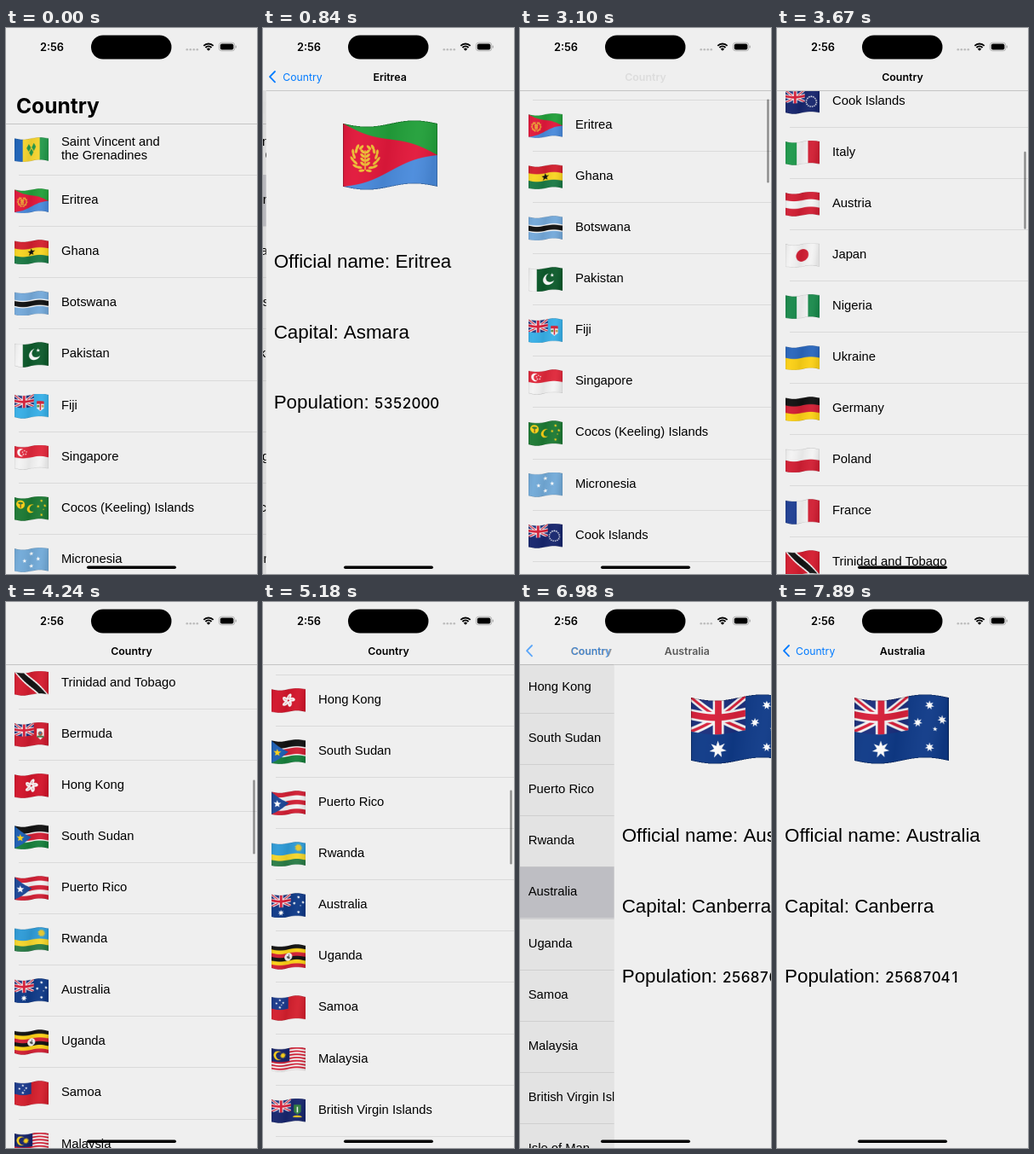
Write an HTML page with a canvas that moves like this. It is 295 px wide and 640 px high and loops after 8000 ms.

```html
<!DOCTYPE html>
<html lang="en">
<head>
<meta charset="utf-8">
<title>Country list</title>
<style>
html, body { margin: 0; width: 100%; height: 100%; overflow: hidden; background: #efefef; }
canvas { display: block; width: 295px; height: 640px; }
</style>
</head>
<body>
<canvas id="stage"></canvas>
<script>
const W = 295, H = 640, LOOP = 8000;
const BG = '#efefef', BLUE = '#007aff', ROW = 60.1, BAR = 73, BIG = 112;
const SANS = '"Liberation Sans", Arial, sans-serif', UI = 'Inter, sans-serif';
const stage = document.getElementById('stage');
const dpr = window.devicePixelRatio || 1;
stage.width = W * dpr;
stage.height = H * dpr;
const ctx = stage.getContext('2d');

const clamp = x => Math.max(0, Math.min(1, x));
const easeOut = x => 1 - (1 - clamp(x)) ** 3;

// ---- Flag parts, drawn on a 60 x 40 field ----
let g;
function box(c, x, y, w, h) { g.fillStyle = c; g.fillRect(x, y, w, h); }
function disc(c, x, y, r) { g.fillStyle = c; g.beginPath(); g.arc(x, y, r, 0, 7); g.fill(); }
function poly(c, ...p) {
  g.fillStyle = c;
  g.beginPath();
  for (let i = 0; i < p.length; i += 2) g.lineTo(p[i], p[i + 1]);
  g.fill();
}
function line(c, w, x1, y1, x2, y2) {
  g.strokeStyle = c;
  g.lineWidth = w;
  g.beginPath();
  g.moveTo(x1, y1);
  g.lineTo(x2, y2);
  g.stroke();
}
function star(c, x, y, r, n = 5, k = 0.42) {
  const p = [];
  for (let i = 0; i < 2 * n; i++) {
    const a = i * Math.PI / n - Math.PI / 2, q = i % 2 ? r * k : r;
    p.push(x + q * Math.cos(a), y + q * Math.sin(a));
  }
  poly(c, ...p);
}
function leaf(c, x, y, a, rx, ry) {
  g.fillStyle = c;
  g.beginPath();
  g.ellipse(x, y, rx, ry, a, 0, 7);
  g.fill();
}
function moon(c, bg, x, y, r, dx, dy = 0) { disc(c, x, y, r); disc(bg, x + dx, y + dy, r * 0.82); }
function rows(...cs) { cs.forEach((c, i) => box(c, 0, i * 40 / cs.length, 60, 40 / cs.length + 0.1)); }
function cols(...cs) { cs.forEach((c, i) => box(c, i * 60 / cs.length, 0, 60 / cs.length + 0.1, 40)); }
function ensign(c) {
  const w = 34.5, h = 21.5;
  box(c, 0, 0, 60, 40);
  g.save();
  g.beginPath();
  g.rect(0, 0, w, h);
  g.clip();
  box('#1b2f7d', 0, 0, w, h);
  for (const [col, t] of [['#f4f4f4', 4.6], ['#d8203a', 1.7]]) {
    line(col, t, 0, 0, w, h);
    line(col, t, 0, h, w, 0);
  }
  for (const [col, t] of [['#f4f4f4', 7], ['#d8203a', 4.2]]) {
    box(col, 0, (h - t) / 2, w, t);
    box(col, (w - t) / 2, 0, t, h);
  }
  g.restore();
}
function shield(c, x, y, w, h) {
  poly(c, x - w / 2, y - h / 2, x + w / 2, y - h / 2, x + w / 2, y + h / 5, x, y + h / 2, x - w / 2, y + h / 5);
}
function wreath(c, x, y, r) {
  for (let i = 1; i < 11; i++) for (const s of [-1, 1]) {
    const a = Math.PI / 2 + s * i * 0.28, d = i % 2 ? r : r * 0.86;
    leaf(c, x + d * Math.cos(a), y + d * Math.sin(a), a + s * 1.1, 1.9, 0.85);
  }
  line(c, 0.8, x, y - r * 0.6, x, y + r * 0.9);
  for (let i = 0; i < 4; i++) for (const s of [-1, 1])
    leaf(c, x + s * 1.7, y - 4.2 + i * 2.6, s * -0.7, 1.7, 0.9);
}

const NAVY = '#0f3a88', GOLD = '#fcd116', RED = '#d21f34';

const countries = [
  ['Saint Vincent and|the Grenadines', () => {
    box('#1d63b8', 0, 0, 15, 40); box('#f8d630', 15, 0, 30, 40); box('#249a4c', 45, 0, 15, 40);
    for (const [x, y] of [[25.5, 16], [34.5, 16], [30, 25]])
      poly('#249a4c', x, y - 7, x + 3.8, y, x, y + 7, x - 3.8, y);
  }],
  ['Eritrea', () => {
    rows('#22a03a', '#4a8bdc');
    poly('#e2183b', 0, 0, 60, 20, 0, 40);
    wreath('#efc034', 14, 20, 8.3);
  }, 'Asmara', '5352000'],
  ['Ghana', () => { rows('#d3202f', '#f9d522', '#1b7a45'); star('#111', 30, 20, 6.8); }],
  ['Botswana', () => { box('#75aadb', 0, 0, 60, 40); box('#fff', 0, 13.5, 60, 13); box('#111', 0, 15.5, 60, 9); }],
  ['Pakistan', () => {
    box('#0d5b2c', 0, 0, 60, 40); box('#f5f5f5', 0, 0, 15, 40);
    moon('#fff', '#0d5b2c', 36, 20.5, 10, 3.2, -2.6); star('#fff', 42, 14, 3.6);
  }],
  ['Fiji', () => {
    ensign('#38b0e8'); shield('#f3f3f3', 46, 22, 13, 18);
    box(RED, 39.5, 13, 13, 5); box(RED, 45, 16, 2, 13); box('#5b8a3c', 40, 20, 4, 4); box('#c79a4a', 48, 20, 4, 4);
  }],
  ['Singapore', () => {
    rows('#e0283b', '#f4f4f4'); moon('#fff', '#e0283b', 12, 10, 7, 3.2);
    for (let i = 0; i < 5; i++) star('#fff', 18 + 3.6 * Math.sin(i * 1.257), 10 - 3.6 * Math.cos(i * 1.257), 1.7);
  }],
  ['Cocos (Keeling) Islands', () => {
    box('#1d7a34', 0, 0, 60, 40); disc(GOLD, 11, 11, 7.5);
    line('#5d4a22', 1.6, 11, 9, 11, 17); leaf('#2f7a33', 11, 8.5, 0, 4.5, 2);
    moon(GOLD, '#1d7a34', 30, 20, 7.5, 3);
    for (const [x, y] of [[48, 8], [42, 18], [54, 16], [48, 33]]) star(GOLD, x, y, 2.9, 7);
    star(GOLD, 51.5, 23, 1.6);
  }],
  ['Micronesia', () => {
    box('#73abd9', 0, 0, 60, 40);
    for (const [x, y] of [[30, 9], [30, 31], [18, 20], [42, 20]]) star('#fff', x, y, 4);
  }],
  ['Cook Islands', () => {
    ensign('#17266e');
    for (let i = 0; i < 15; i++) star('#fff', 46 + 9 * Math.sin(i * 0.419), 22 - 9 * Math.cos(i * 0.419), 1.9);
  }],
  ['Italy', () => cols('#1f9a4c', '#f4f4f4', RED)],
  ['Austria', () => rows(RED, '#f4f4f4', RED)],
  ['Japan', () => { box('#f4f4f4', 0, 0, 60, 40); disc(RED, 30, 20, 11); }],
  ['Nigeria', () => cols('#1a8a4c', '#f4f4f4', '#1a8a4c')],
  ['Ukraine', () => rows('#2a67bd', GOLD)],
  ['Germany', () => rows('#111', RED, GOLD)],
  ['Poland', () => rows('#f4f4f4', RED)],
  ['France', () => cols('#1f3f94', '#f4f4f4', RED)],
  ['Trinidad and Tobago', () => {
    box('#d51d30', 0, 0, 60, 40);
    poly('#fff', 0, 0, 20, 0, 60, 40, 40, 40); poly('#111', 3.2, 0, 16.8, 0, 56.8, 40, 43.2, 40);
  }],
  ['Bermuda', () => {
    ensign('#cf1b2f'); shield('#f4f4f4', 46, 21, 13, 20);
    box('#3d7f4a', 40, 24, 12, 3); disc('#b5553c', 46, 20, 4); disc('#3a6ea5', 46, 19, 2);
  }],
  ['Hong Kong', () => {
    box('#d3152b', 0, 0, 60, 40);
    for (let i = 0; i < 5; i++) {
      const a = i * 1.257 - 1.35, x = 30 + 6.6 * Math.cos(a), y = 20 + 6.6 * Math.sin(a);
      leaf('#fff', x, y, a + 0.35, 5.6, 3.4);
      line('#d3152b', 0.6, 30 + 4 * Math.cos(a), 20 + 4 * Math.sin(a), x + 2 * Math.cos(a), y + 2 * Math.sin(a));
    }
  }],
  ['South Sudan', () => {
    rows('#111', RED, '#16803c');
    box('#fff', 0, 12, 60, 2.2); box('#fff', 0, 25.8, 60, 2.2);
    poly('#1c5fb4', 0, 0, 30, 20, 0, 40); star(GOLD, 10.5, 20, 7);
  }],
  ['Puerto Rico', () => {
    rows(RED, '#f4f4f4', RED, '#f4f4f4', RED);
    poly('#1b4797', 0, 0, 31, 20, 0, 40); star('#fff', 10.5, 20, 7);
  }],
  ['Rwanda', () => {
    box('#2f9cd8', 0, 0, 60, 20); box('#f6d72c', 0, 20, 60, 10); box('#2a7d47', 0, 30, 60, 10);
    star('#e5c62c', 48, 10, 7.5, 16, 0.6);
  }],
  ['Australia', () => {
    ensign(NAVY); star('#fff', 17, 31, 5.6, 7, 0.45);
    for (const [x, y] of [[48, 6.7], [40.5, 17.5], [56, 14.9], [48, 33.3]]) star('#fff', x, y, 3, 7, 0.45);
    star('#fff', 51.5, 21.5, 1.6);
  }, 'Canberra', '25687041'],
  ['Uganda', () => {
    rows('#111', GOLD, RED, '#111', GOLD, RED);
    disc('#f4f4f4', 30, 20, 6.8); leaf('#555', 30, 21, 0.7, 3.4, 1.8); line('#555', 1, 31, 20, 31, 15.5);
  }],
  ['Samoa', () => {
    box('#d5202e', 0, 0, 60, 40); box('#1b3a8c', 0, 0, 30, 21);
    for (const [x, y, r] of [[15, 4, 2.4], [9, 10, 2.4], [21, 9, 2.4], [15, 17, 2.7], [18, 12.5, 1.5]]) star('#fff', x, y, r);
  }],
  ['Malaysia', () => {
    rows(...Array.from({ length: 14 }, (_, i) => i % 2 ? '#f4f4f4' : RED));
    box('#16246b', 0, 0, 32, 23); moon(GOLD, '#16246b', 12, 11.5, 8, 2.6); star(GOLD, 20.5, 11.5, 6, 14, 0.5);
  }],
  ['British Virgin Islands', () => {
    ensign('#17266e'); shield('#2f7d3c', 46, 20, 13, 18);
    line('#f4f4f4', 2, 46, 15, 46, 25); leaf(GOLD, 46, 32, 0, 8, 1.6);
  }],
  ['Isle of Man', () => {
    box('#cb1e30', 0, 0, 60, 40);
    for (let i = 0; i < 3; i++) {
      const a = i * 2.094 - 1.3, x = 30 + 8 * Math.cos(a), y = 20 + 8 * Math.sin(a);
      line('#eee', 3.2, 30, 20, x, y);
      line('#eee', 2.6, x, y, x + 8 * Math.cos(a + 1.9), y + 8 * Math.sin(a + 1.9));
    }
  }]
];

// ---- Waving flag: the flat field cut into shifted columns ----
const FW = 111, FH = 74, FS = 2;
function makeFlag(paint) {
  const flat = document.createElement('canvas');
  flat.width = FW * FS;
  flat.height = FH * FS;
  g = flat.getContext('2d');
  g.scale(flat.width / 60, flat.height / 40);
  paint();
  g.strokeStyle = 'rgba(0,0,0,.3)';
  g.lineWidth = 0.8;
  g.strokeRect(0, 0, 60, 40);

  const flag = document.createElement('canvas');
  flag.width = flat.width;
  flag.height = (FH + 8) * FS;
  const f = flag.getContext('2d');
  for (let x = 0; x < flat.width; x++) {
    const y = 4 + 3.6 * Math.sin(2 * Math.PI * x / flat.width);
    f.drawImage(flat, x, 0, 1, flat.height, x, y * FS, 1, flat.height);
  }
  f.globalCompositeOperation = 'source-atop';
  const shade = f.createLinearGradient(0, 0, flag.width, 30);
  shade.addColorStop(0, 'rgba(0,0,0,.08)');
  shade.addColorStop(0.2, 'rgba(255,255,255,.03)');
  shade.addColorStop(0.5, 'rgba(0,0,0,.06)');
  shade.addColorStop(0.8, 'rgba(255,255,255,.04)');
  shade.addColorStop(1, 'rgba(0,0,0,.08)');
  f.fillStyle = shade;
  f.fillRect(0, 0, flag.width, flag.height);
  return flag;
}
const flags = countries.map(c => makeFlag(c[1]));

function drawFlag(i, x, y, w) {
  ctx.drawImage(flags[i], x, y, w, w * (FH + 8) / FW);
}

// ---- Screen ----
function fill(c, x, y, w, h) { ctx.fillStyle = c; ctx.fillRect(x, y, w, h); }
function pill(c, x, y, w, h, r = h / 2) {
  ctx.fillStyle = c;
  ctx.beginPath();
  ctx.roundRect(x, y, w, h, r);
  ctx.fill();
}
function text(s, x, y, font, { color = '#000', align = 'left', alpha = 1 } = {}) {
  if (alpha <= 0) return;
  ctx.save();
  ctx.globalAlpha = alpha;
  ctx.font = font;
  ctx.fillStyle = color;
  ctx.textAlign = align;
  ctx.fillText(s, x, y);
  ctx.restore();
}
// Tabular figures
function digits(s, x, y, font, step) {
  [...s].forEach((d, i) => text(d, x + (i + 0.5) * step, y, font, { align: 'center' }));
}

// start, end, offset from, offset to, eased
const drags = [
  [2980, 3100, 0, 86, false],
  [3100, 3790, 86, 600, true],
  [3880, 4600, 600, 1204, true],
  [4710, 5510, 1204, 1231, true],
  [5620, 5980, 1231, 1244, true]
];
function scrollAt(t) {
  let s = 0;
  for (const [a, b, from, to, eased] of drags) {
    if (t < a) break;
    const x = clamp((t - a) / (b - a));
    s = from + (to - from) * (eased ? easeOut(x) : x);
  }
  return s;
}

// 0 = list, 1 = detail page
function pageAt(t) {
  if (t < 500) return 0;
  if (t < 2180) return easeOut((t - 480) / 470);
  if (t < 6870) return 1 - easeOut((t - 2180) / 470);
  return easeOut((t - 6850) / 470);
}

function drawList(t, s, page, chosen) {
  const edge = Math.max(BAR, BIG - s);
  fill(BG, 0, 0, W, H);
  countries.forEach(([name], i) => {
    const y = BIG + i * ROW - s;
    if (y > H || y < BAR - ROW) return;
    if (i === chosen && page > 0) fill(`rgba(200,200,205,${clamp(page * 4)})`, 0, y, W, ROW);
    drawFlag(i, 10, y + 16, 39.5);
    const lines = name.split('|');
    lines.forEach((l, k) => text(l, 65, y + (lines.length > 1 ? 26 + k * 16.3 : 34), '14.8px ' + SANS));
    fill('#dadada', 15, Math.round(y + ROW), W - 15, 1);
  });
  fill(BG, 0, 0, W, edge);
  fill('#c4c4c4', 0, Math.round(edge), W, 1);
  if (s < 40) {
    ctx.save();
    ctx.beginPath();
    ctx.rect(0, BAR, W, H);
    ctx.clip();
    text('Country', 12, 100 - s, '700 24.5px ' + UI, { alpha: 1 - page });
    ctx.restore();
  }
  if (t >= 2990) {
    const len = 87 + Math.max(0, 12 * (1 - s / 900));
    pill('rgba(0,0,0,.42)', 290.3, BAR + s * 0.12, 2.4, len);
  }
}

function drawDetail(i) {
  const [name, , capital, people] = countries[i], font = '22.4px ' + SANS;
  fill(BG, 0, 0, W, H);
  drawFlag(i, 90.5, 108, FW);
  text('Official name: ' + name, 9, 281, font);
  text('Capital: ' + capital, 9, 364, font);
  text('Population:', 9, 446, font);
  digits(people, 127, 446, '500 17px ' + UI, 10.95);
  fill('#c8c8c8', 0, BAR, W, 1);
}

function drawBar(t, page, chosen) {
  const mid = { align: 'center' }, title = '600 12.4px ' + UI, slide = 102;
  text('Country', 147.5 - page * slide, 61.5, title, { ...mid, alpha: clamp((t - 3085) / 200) * (1 - page) });
  if (page <= 0) return;
  text(countries[chosen][0], 147.5 + (1 - page) * 130, 61.5, title, { ...mid, alpha: page });
  const pressed = t >= 2090 && t < 2700;
  text('Country', 22 + (1 - page) * slide, 61.5, '12.2px ' + UI, { color: BLUE, alpha: page * (pressed ? 0.2 : 1) });
  ctx.save();
  ctx.globalAlpha = page * (pressed ? 0.45 : 1);
  ctx.strokeStyle = BLUE;
  ctx.lineWidth = 1.8;
  ctx.lineCap = ctx.lineJoin = 'round';
  ctx.beginPath();
  ctx.moveTo(14, 51);
  ctx.lineTo(8, 57.2);
  ctx.lineTo(14, 63.4);
  ctx.stroke();
  ctx.restore();
}

function drawStatus() {
  text('2:56', 54, 26.5, '600 12.8px ' + UI, { align: 'center' });
  pill('#000', 100, 8.5, 94.5, 28);
  for (let i = 0; i < 4; i++) pill('#bcbcbc', 211.5 + i * 4, 24, 2.6, 2.6);
  ctx.strokeStyle = '#000';
  ctx.lineWidth = 1.9;
  for (const r of [5, 8]) {
    ctx.beginPath();
    ctx.arc(238, 26.5, r, -Math.PI * 0.75, -Math.PI * 0.25);
    ctx.stroke();
  }
  ctx.fillStyle = '#000';
  ctx.beginPath();
  ctx.moveTo(238, 26.8);
  ctx.arc(238, 26.8, 3, -Math.PI * 0.75, -Math.PI * 0.25);
  ctx.fill();
  ctx.strokeStyle = '#a5a5a5';
  ctx.lineWidth = 0.8;
  ctx.beginPath();
  ctx.roundRect(250.4, 17.2, 18.4, 9.6, 3);
  ctx.stroke();
  pill('#000', 251.8, 18.6, 15.6, 6.8, 1.9);
  pill('#a5a5a5', 269.6, 20.4, 1.2, 3.2, 0.6);
  pill('#000', 95, 630.4, 105, 3.6);
}

function draw(t) {
  const s = scrollAt(t), page = pageAt(t), chosen = t < 4000 ? 1 : 24;
  ctx.setTransform(dpr, 0, 0, dpr, 0, 0);
  ctx.imageSmoothingQuality = 'high';
  fill(BG, 0, 0, W, H);
  if (page < 1) {
    ctx.save();
    ctx.translate(-0.3 * W * page, 0);
    drawList(t, s, page, chosen);
    ctx.restore();
    fill(`rgba(0,0,0,${0.08 * page})`, 0, BAR, W, H);
  }
  if (page > 0) {
    ctx.save();
    ctx.translate(W * (1 - page), 0);
    drawDetail(chosen);
    ctx.restore();
  }
  drawBar(t, page, chosen);
  drawStatus();
}

const start = performance.now();
function tick() {
  draw((performance.now() - start) % LOOP);
  requestAnimationFrame(tick);
}
tick();
</script>
</body>
</html>
```
